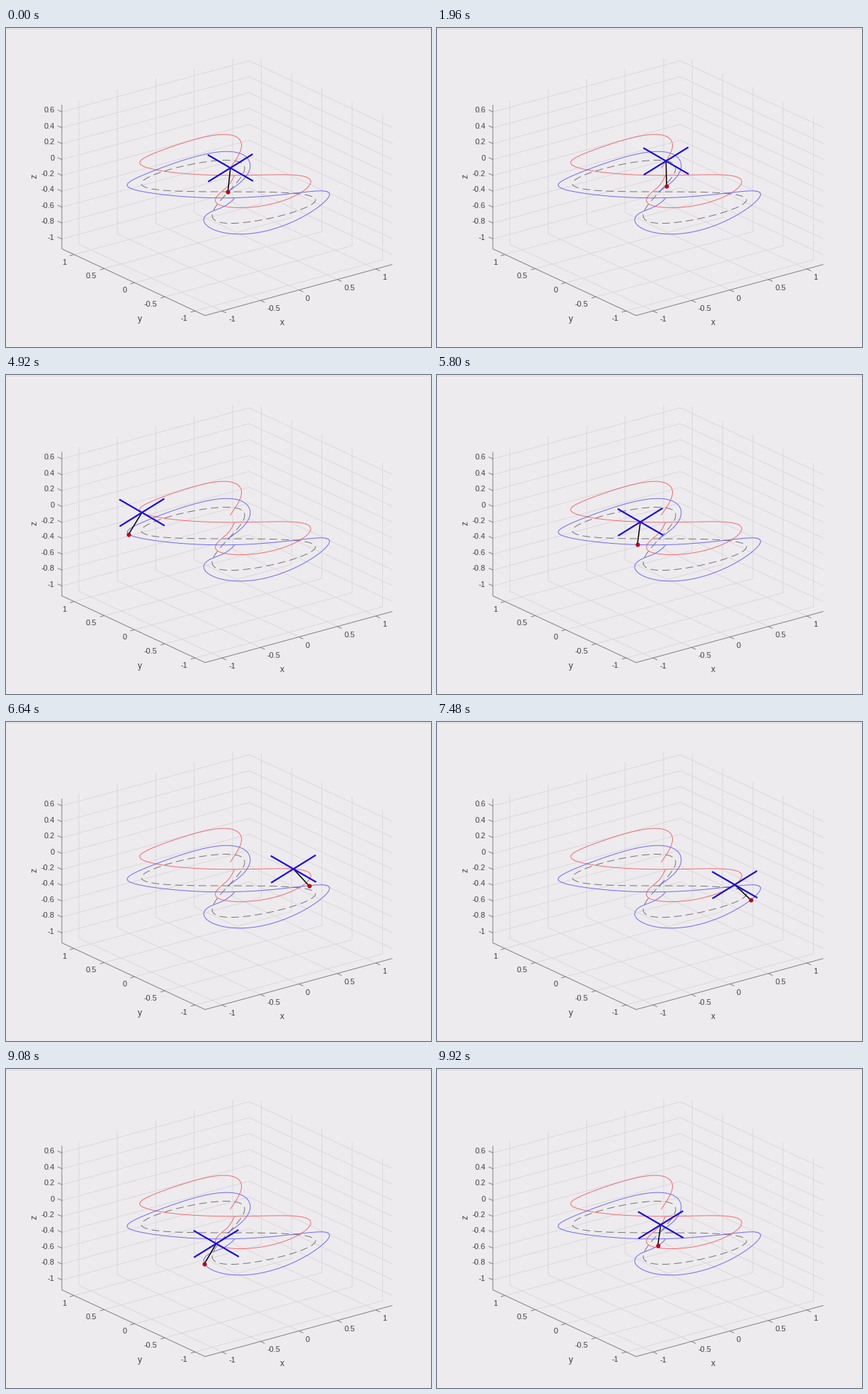
Animation, 600 px wide and 450 px high, one loop 9.96 s. Source, as a matplotlib script:

```python
import numpy as np
import matplotlib.pyplot as plt
from matplotlib.animation import FuncAnimation
from matplotlib.collections import LineCollection

W, H, DPI = 600, 450, 100
FRAMES, STEP_MS = 249, 40
PT = 72 / DPI
INK = "#403e40"

plt.rcParams["font.family"] = "Liberation Sans"

X_LIM, Y_LIM, Z_LIM = (-1.22, 1.215), (-1.164, 1.2), (-1.125, 0.69)
X_TICKS = Y_TICKS = (-1, -0.5, 0, 0.5, 1)
Z_TICKS = np.arange(-5, 4) / 5

sin, cos, exp = np.sin, np.cos, np.exp


def project(x, y, z):
    """Axes coordinates to stage pixels."""
    return (313.5 + 108.6 * x - 85.5 * y,
            196.7 - 29.6 * x - 39.8 * y - 112 * z)


# All three paths are figure eights: first harmonic against second.
def reference(a):
    return (313.5 - 72 * sin(a) + 68 * sin(2 * a),
            230.5 - 34.3 * sin(a) - 17.1 * sin(2 * a))


def settling(a):
    """The flight starts high and ends its lap a little low."""
    return 0.5 * exp(-((a - 2 * np.pi) / 0.26) ** 2) - exp(-(a / 0.52) ** 2)


def drone(a):
    x = 310.8 - 74 * sin(a) + 64 * sin(2 * a + 0.086)
    y = (205.1 - 39.4 * sin(a) - 19.6 * sin(2 * a) + cos(2 * a)
         + 1.8 * cos(3 * a) + 3 * cos(4 * a))
    return x, y + 14 * settling(a)


def load(a):
    x = 312.6 - 79 * sin(a + 0.035) + 83 * sin(2 * a + 0.035)
    y = (233.7 - 39.6 * sin(a) + 1.5 * cos(a) - 23 * sin(2 * a)
         + 2.4 * cos(2 * a) + 3.8 * sin(3 * a) + 5.6 * cos(4 * a - 0.63))
    return x, y + 11.5 * settling(a)


def phase_at(t):
    """Rest, then a smooth start into a steady turn."""
    soft = 0.28
    return np.radians(45.5) * soft * np.log1p(exp((t - 2.03) / soft))


fig = plt.figure(figsize=(W / DPI, H / DPI), dpi=DPI, facecolor="#edebee")
ax = fig.add_axes([0, 0, 1, 1])
ax.set(xlim=(-0.5, W - 0.5), ylim=(H - 0.5, -0.5))
ax.axis("off")


def lines(segments, color, width):
    ax.add_collection(LineCollection(segments, colors=color,
                                     linewidths=width * PT))


def label(x, y, text, size=11, **kw):
    ax.text(x, y, text, fontsize=size * PT, color=INK,
            va="center_baseline", **kw)


def draw_box():
    (x0, x1), (y0, y1), (z0, z1) = X_LIM, Y_LIM, Z_LIM
    grid, ticks = [], []
    for x in X_TICKS:
        grid.append([project(x, y0, z0), project(x, y1, z0),
                     project(x, y1, z1)])
        px, py = project(x, y0, z0)
        ticks.append([(px, py), (px + 6, py + 2.8)])
        label(px + 9.5, py + 11, f"{x:g}", ha="left")
    for y in Y_TICKS:
        grid.append([project(x0, y, z0), project(x1, y, z0),
                     project(x1, y, z1)])
        px, py = project(x0, y, z0)
        ticks.append([(px, py), (px - 6, py + 1.7)])
        label(px - 11, py + 10, f"{y:g}", ha="right")
    for z in Z_TICKS:
        grid.append([project(x0, y1, z), project(x1, y1, z),
                     project(x1, y0, z)])
        px, py = project(x0, y1, z)
        ticks.append([(px, py), (px - 6, py - 2.8)])
        label(px - 10.5, py - 3, f"{z:g}", ha="right")
    edges = [[project(x0, y1, z1), project(x0, y1, z0),
              project(x0, y0, z0), project(x1, y0, z0)]]
    lines(grid, "#d9d7da", 0.9)
    lines(edges + ticks, "#777577", 0.9)
    label(389, 414, "x", 12, ha="center")
    label(188, 409, "y", 12, ha="center")
    ax.text(40, 209, "z", fontsize=12 * PT, color=INK, rotation=90,
            ha="center", va="center")


def draw_paths():
    lap = np.linspace(0, 2 * np.pi, 400)
    ax.plot(*reference(lap), color="#6a686a", lw=0.9 * PT,
            dashes=(12, 6.5), dash_capstyle="butt")
    flight = np.linspace(0, np.radians(366), 700)
    ax.plot(*drone(flight), color="#f2666c", lw=0.95 * PT)
    ax.plot(*load(flight), color="#6c64f2", lw=0.95 * PT)


lines([[(-1, 0), (W, 0)]], "#dad8db", 1)
draw_box()
draw_paths()

cable, = ax.plot([], [], color="#0c0a0c", lw=1.6 * PT, zorder=5)
arms = [ax.plot([], [], color="#1a0cdc", lw=2.2 * PT, zorder=6,
                solid_capstyle="butt")[0] for _ in range(2)]
dot, = ax.plot([], [], "o", color="#c4001c", ms=5.2 * PT, mec="#9c0018",
               mew=0.8 * PT, zorder=7)
ARM_REACH = ((32, 18.5), (31.5, -19.5))


def update(i):
    phase = phase_at(i * STEP_MS / 1000)
    qx, qy = drone(phase)
    lx, ly = load(phase)
    cable.set_data([qx, lx], [qy, ly])
    dot.set_data([lx], [ly])
    for arm, (dx, dy) in zip(arms, ARM_REACH):
        arm.set_data([qx - dx, qx + dx], [qy - dy, qy + dy])
    return [cable, dot, *arms]


anim = FuncAnimation(fig, update, frames=FRAMES, interval=STEP_MS,
                     repeat=True)
plt.show()
```
